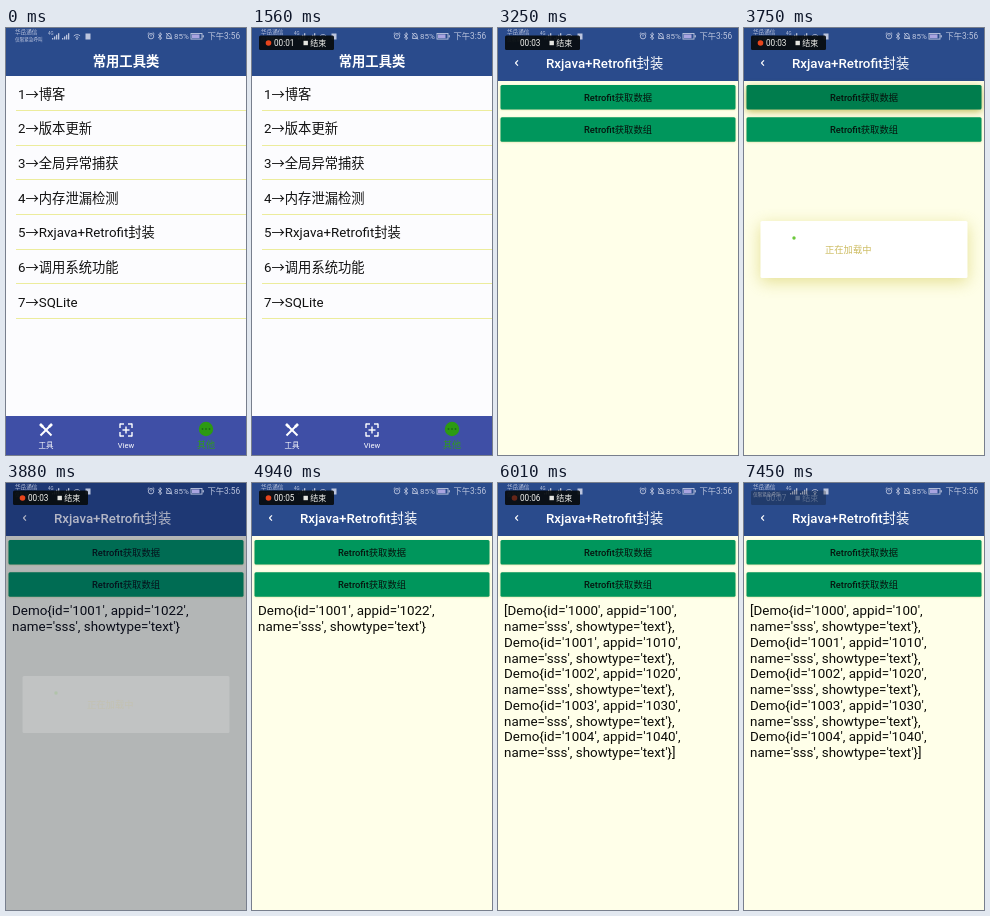
An HTML page with a canvas for the animation above (7520 ms loop, 240 px wide and 427 px high).

```html
<!DOCTYPE html>
<html lang="zh">
<head>
<meta charset="utf-8">
<title>工具类</title>
<style>
html, body { margin: 0; width: 100%; height: 100%; overflow: hidden; background: #fff; }
canvas { display: block; width: 240px; height: 427px; }
</style>
</head>
<body>
<canvas id="stage"></canvas>
<script>
const W = 240, H = 427, LOOP = 7520;
const OPEN = 1900, OPEN_END = 2350;
const canvas = document.getElementById('stage');
const ctx = canvas.getContext('2d');
const ratio = window.devicePixelRatio || 1;
canvas.width = W * ratio;
canvas.height = H * ratio;

const CJK = '"Noto Sans CJK SC", "Noto Sans CJK", sans-serif';
const SANS = 'Roboto, ' + CJK;
const BLUE = '#2a4b8c', PAPER = '#fcfcfe', STATUS = '#bcc5de', WHITE = '#fff';
const CENTER = { align: 'center' };

const ROWS = ['博客', '版本更新', '全局异常捕获', '内存泄漏检测', 'Rxjava+Retrofit封装', '调用系统功能', 'SQLite'];
const demo = (id, app) => [`Demo{id='${id}', appid='${app}',`, "name='sss', showtype='text'}"];
const ONE = demo(1001, 1022);
const MANY = [0, 1, 2, 3, 4].flatMap(i => {
  const [head, tail] = demo(1000 + i, i ? 1000 + i * 10 : 100);
  return [(i ? '' : '[') + head, tail + (i < 4 ? ',' : ']')];
});

const REQUESTS = [
  { label: 'Retrofit获取数据', down: 3250, answer: 3840, shade: 'rgb(0,10,60)', depth: .3, result: ONE },
  { label: 'Retrofit获取数组', down: 4950, answer: 5665, shade: 'rgb(20,14,0)', depth: .58, result: MANY }
];

const span = (t, a, b) => Math.min(1, Math.max(0, (t - a) / (b - a)));
const pulse = (t, a, b, c, d) => span(t, a, b) * (1 - span(t, c, d));

function rect(x, y, w, h, color) {
  ctx.fillStyle = color;
  ctx.fillRect(x, y, w, h);
}

function panel(x, y, w, h, color) {
  ctx.fillStyle = color;
  ctx.beginPath();
  ctx.roundRect(x, y, w, h, 1.5);
  ctx.fill();
}

function dot(x, y, r, color) {
  ctx.fillStyle = color;
  ctx.beginPath();
  ctx.arc(x, y, r, 0, 7);
  ctx.fill();
}

function arc(x, y, r, from = 0, to = 7) {
  ctx.beginPath();
  ctx.arc(x, y, r, from, to);
  ctx.stroke();
}

function pen(color, width) {
  ctx.strokeStyle = color;
  ctx.lineWidth = width;
}

function line(x1, y1, x2, y2) {
  ctx.beginPath();
  ctx.moveTo(x1, y1);
  ctx.lineTo(x2, y2);
  ctx.stroke();
}

// y is the middle of the capitals
function text(s, x, y, size, color, { align = 'left', weight = 400, family = SANS } = {}) {
  ctx.font = `${weight} ${size}px ${family}`;
  ctx.textAlign = align;
  ctx.fillStyle = color;
  ctx.fillText(s, x, y + size * .36);
}

function layer(alpha, draw, x = 0, y = 0) {
  if (alpha <= 0) return;
  ctx.save();
  ctx.globalAlpha *= alpha;
  ctx.translate(x, y);
  draw();
  ctx.restore();
}

function shadow(color, blur, drop) {
  ctx.shadowColor = color;
  ctx.shadowBlur = blur * ratio;
  ctx.shadowOffsetY = drop * ratio;
}

function toolsIcon() {
  for (const s of [-1, 1]) {
    pen(WHITE, 2);
    line(-5 * s, -5, 5.5 * s, 5.5);
    pen(WHITE, 2.6);
    line(6 * s, -6, 3 * s, -3);
  }
}

function scanIcon() {
  pen(WHITE, 1.4);
  for (const s of [-1, 1]) {
    for (const u of [-6, 6]) {
      line(u, s * 6.6, u, s * 2);
      line(s * 6, u, s * 2, u);
    }
  }
  line(0, -3.5, 0, 3.5);
  line(-3.5, 0, 3.5, 0);
}

function moreIcon() {
  dot(0, 0, 7.2, '#2c9a12');
  for (const s of [-1, 0, 1]) dot(s * 3.5, 0, .9, '#1d6b16');
}

function tabs() {
  rect(0, 388, W, 39, '#3f4fa6');
  layer(1, toolsIcon, 40, 402);
  layer(1, scanIcon, 120, 402);
  layer(1, moreIcon, 200, 401);
  text('工具', 40, 417, 7.5, WHITE, CENTER);
  text('View', 120, 417, 7.6, WHITE, CENTER);
  text('其他', 200, 417, 9, '#2f9a20', CENTER);
}

function listPage(t) {
  rect(0, 0, W, H, PAPER);
  rect(0, 0, W, 48, BLUE);
  text('常用工具类', 120, 33, 13.3, WHITE, { align: 'center', weight: 700 });
  layer(.12 * span(t, 1740, 1830), () => rect(0, 187, W, 34, '#000'));
  ROWS.forEach((label, i) => {
    const y = 66 + i * 34.65;
    text(i + 1, 12, y, 13.3, '#111');
    text('→', 19.5, y, 13.3, '#111', { family: CJK });
    text(label, 32.8, y, 13.3, '#111');
    rect(10, Math.round(y + 16), W - 10, 1, '#ecec9c');
  });
  tabs();
}

function button({ label, down, answer }, i, t) {
  const y = 57 + i * 32.3;
  const press = pulse(t, down, down + 300, answer - 60, answer);
  ctx.save();
  shadow(`rgba(170,165,40,${.35 + .4 * press})`, 2 + 5 * press, .5 + 1.5 * press);
  panel(2.5, y, 235, 24.5, '#00965c');
  shadow('transparent', 0, 0);
  ctx.clip();
  layer(.17, () => dot(120, y + 12, 130 * press, '#000'));
  ctx.restore();
  text(label, 120, y + 12.6, 9.3, '#06140e', { align: 'center', weight: 500 });
}

function loading({ answer, shade, depth }, t) {
  layer(depth * pulse(t, answer - 90, answer + 20, answer + 40, answer + 240), () => rect(0, 0, W, H, shade));
  layer(pulse(t, answer - 230, answer - 90, answer, answer + 50), () => {
    shadow(`rgba(205,195,60,${.5 * (1 - span(t, answer - 90, answer))})`, 16, 4);
    panel(16.5, 193, 207, 57, WHITE);
    shadow('transparent', 0, 0);
    dot(50, 210, 1.7, '#6cc83c');
    text('正在加载中', 81, 221.5, 9.3, '#cdbc62');
  });
}

function requestPage(t) {
  rect(0, 0, W, H, '#ffffe9');
  rect(0, 0, W, 53, BLUE);
  pen(WHITE, 1.1);
  for (const s of [-1, 1]) line(17.4, 35, 20, 35 + s * 2.7);
  text('Rxjava+Retrofit封装', 48, 35.5, 13.3, WHITE, { weight: 500 });
  REQUESTS.forEach((r, i) => button(r, i, t));
  const done = REQUESTS.filter(r => t >= r.answer).pop();
  if (done) done.result.forEach((s, i) => text(s, 6, 127.5 + i * 15.75, 13.4, '#0c0c08'));
  REQUESTS.forEach(r => loading(r, t));
}

function alarm() {
  arc(0, 0, 2.7);
  line(0, -1.7, 0, .3);
  for (const s of [-1, 1]) line(s * 1.8, -3.7, s * 3.4, -2.3);
}

function bluetooth() {
  line(0, -3.5, 0, 3.5);
  for (const s of [-1, 1]) {
    line(-1.9, -1.8 * s, 1.8, 1.8 * s);
    line(1.8, 1.8 * s, 0, 3.5 * s);
  }
}

function mutedBell() {
  arc(0, -.8, 2, Math.PI, 0);
  for (const s of [-1, 1]) line(s * 2, -.8, s * 2.5, 2.3);
  line(-2.5, 2.3, 2.5, 2.3);
  line(-3, -3.2, 3, 3.3);
}

function statusBar() {
  text('华岳通信', 9, 4, 5.6, STATUS);
  text('仅限紧急呼叫', 9, 11.5, 4.6, STATUS);
  text('4G', 42, 5.5, 4.5, STATUS);
  for (const x of [46, 56]) {
    for (let i = 0; i < 4; i++) rect(x + i * 2, 10 - i * 1.6, 1.3, 1.5 + i * 1.6, STATUS);
  }
  pen(STATUS, .9);
  for (const r of [2.2, 4.4]) arc(71, 11, r, -2.4, -.74);
  dot(71, 10.8, .9, STATUS);
  rect(79.5, 5.5, 5, 6, STATUS);
  [alarm, bluetooth, mutedBell].forEach((icon, i) => layer(1, icon, 145 + i * 9, 8.2));
  text('85%', 168, 8.3, 8, STATUS);
  ctx.strokeRect(185, 5.5, 11, 5.6);
  rect(186, 6.4, 7.5, 3.8, '#a9a4e0');
  rect(196.6, 7.2, 1.2, 2.2, STATUS);
  text('下午3:56', 201.5, 8.4, 8.3, STATUS);
}

function recorder(t) {
  layer(span(t, 60, 190) * (1 - .72 * span(t, 7300, 7450)), () => {
    panel(7, 7.5, 75, 14.5, 'rgba(8,12,14,.93)');
    text('00:0' + Math.floor((t + 60) / 1000), 22, 15, 8.2, '#f4f4f0');
    rect(51.5, 12.8, 4.4, 4.4, '#e4e4e0');
    text('结束', 58.3, 15, 8, '#f4f4f0');
    const phase = (t + 560) % 1000;
    const lit = pulse(phase, 0, 120, 500, 620) * (1 - span(t, 7300, 7440));
    layer(lit, () => dot(16.5, 15, 2.8, '#e8451c'));
  });
}

function draw(now) {
  const t = now % LOOP;
  ctx.setTransform(ratio, 0, 0, ratio, 0, 0);
  const x = W * Math.pow(1 - span(t, OPEN, OPEN_END), 3.5);
  rect(0, 0, W, H, PAPER);
  if (x > 0) layer(1, () => listPage(t), (x - W) * .25);
  if (x < W) layer(1, () => requestPage(t), x);
  statusBar();
  recorder(t);
}

const start = performance.now();
function tick() {
  draw(performance.now() - start);
  requestAnimationFrame(tick);
}
tick();
</script>
</body>
</html>
```
